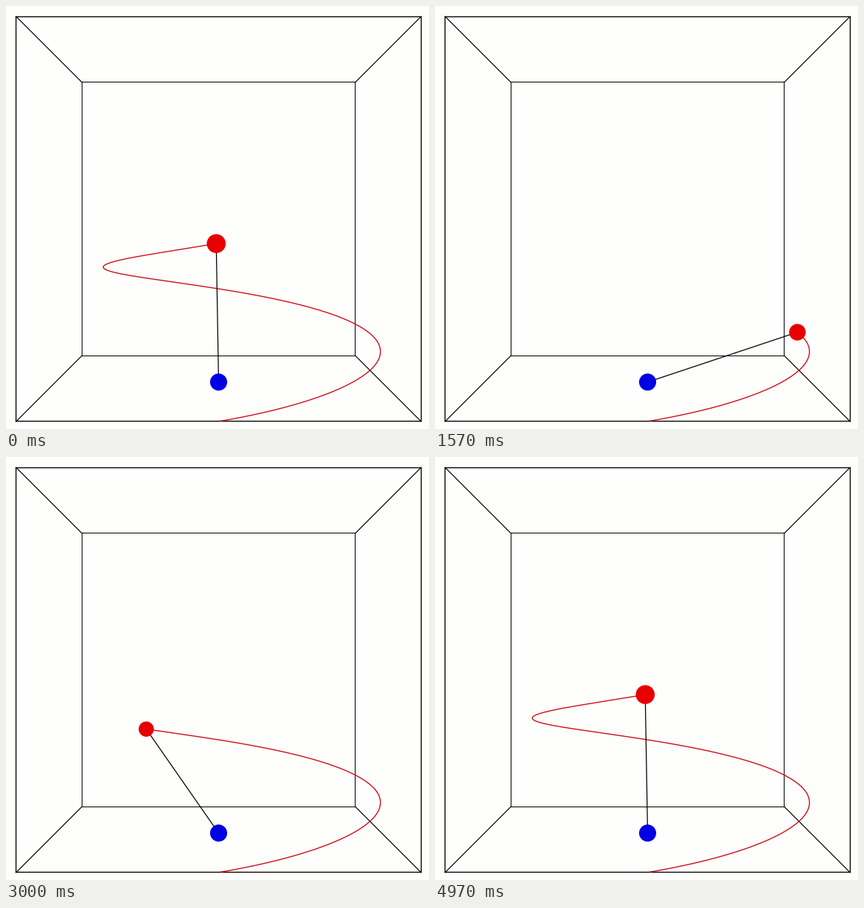
A matplotlib script that plays this animation: 570x570 px, repeating every 5000 ms.

```python
import numpy as np
import matplotlib.pyplot as plt
from matplotlib.animation import FuncAnimation
from matplotlib.patches import Circle

SIZE, DPI = 570, 100
FRAMES, LOOP_MS = 150, 5000
CX, CY = 286.5, 287.0        # vanishing point
FOCAL, DIST = 1131.6, 5.149  # perspective; the box spans -1..1
BALL = 0.0523
BLACK, RED, BLUE = "#000000", "#e80000", "#0000e4"
RESET = 11                   # the sweep restarts here, after the hold

# azimuth in degrees against frames since the restart
KEY_STEPS = [0, 21, 36, 60, 99, 118, 129.6]
KEY_ANGLES = [0.6, 59, 99.3, 164.3, 275, 326.7, 358.5]


def px(width):
    return width * 72 / DPI


def project(x, y, z):
    scale = FOCAL / (DIST - z)
    return CX + x * scale, CY - y * scale, scale


def tip(azimuth):
    """Point on a unit sphere round the blue ball, rising 60 degrees per turn."""
    a = np.radians(azimuth)
    rise = a / 6
    return np.cos(rise) * np.sin(a), np.sin(rise) - 1, np.cos(rise) * np.cos(a)


fig = plt.figure(figsize=(SIZE / DPI, SIZE / DPI), dpi=DPI, facecolor="#fefefd")
ax = fig.add_axes([0, 0, 1, 1])
ax.set_xlim(0, SIZE)
ax.set_ylim(SIZE, 0)
ax.axis("off")


def edge(p, q, width):
    ends = np.array([project(*p)[:2], project(*q)[:2]])
    if p[2] == q[2]:
        ends -= 0.5  # level and upright lines snap to the next pixel centre
    ax.plot(*ends.T, color=BLACK, lw=px(width), zorder=1,
            solid_capstyle="projecting")


corners = [(-1, -1), (1, -1), (1, 1), (-1, 1)]
for a, b in zip(corners, corners[1:] + corners[:1]):
    edge((*a, 1), (*b, 1), 1.35)
    edge((*a, -1), (*b, -1), 1.0)
    edge((*a, 1), (*a, -1), 1.2)

base_x, base_y, base_scale = project(0, -1, 0)
trail, = ax.plot([], [], color="#cc0a14", lw=px(1.35), zorder=2)
rod, = ax.plot([], [], color=BLACK, lw=px(1.25), zorder=3)
ax.add_patch(Circle((base_x, base_y), BALL * base_scale, fc=BLUE, lw=0, zorder=4))
ball = ax.add_patch(Circle((0, 0), 1, fc=RED, lw=0, zorder=5))


def update(frame):
    angle = np.interp((frame - RESET) % FRAMES, KEY_STEPS, KEY_ANGLES)
    xs, ys, scales = project(*tip(np.linspace(KEY_ANGLES[0], angle, 240)))
    trail.set_data(xs, ys)
    rod.set_data([base_x, xs[-1]], [base_y, ys[-1]])
    ball.center = xs[-1], ys[-1]
    ball.radius = BALL * scales[-1]
    return trail, rod, ball


anim = FuncAnimation(fig, update, frames=FRAMES, interval=LOOP_MS / FRAMES,
                     init_func=lambda: update(0), repeat=True, repeat_delay=0)
plt.show()
```
